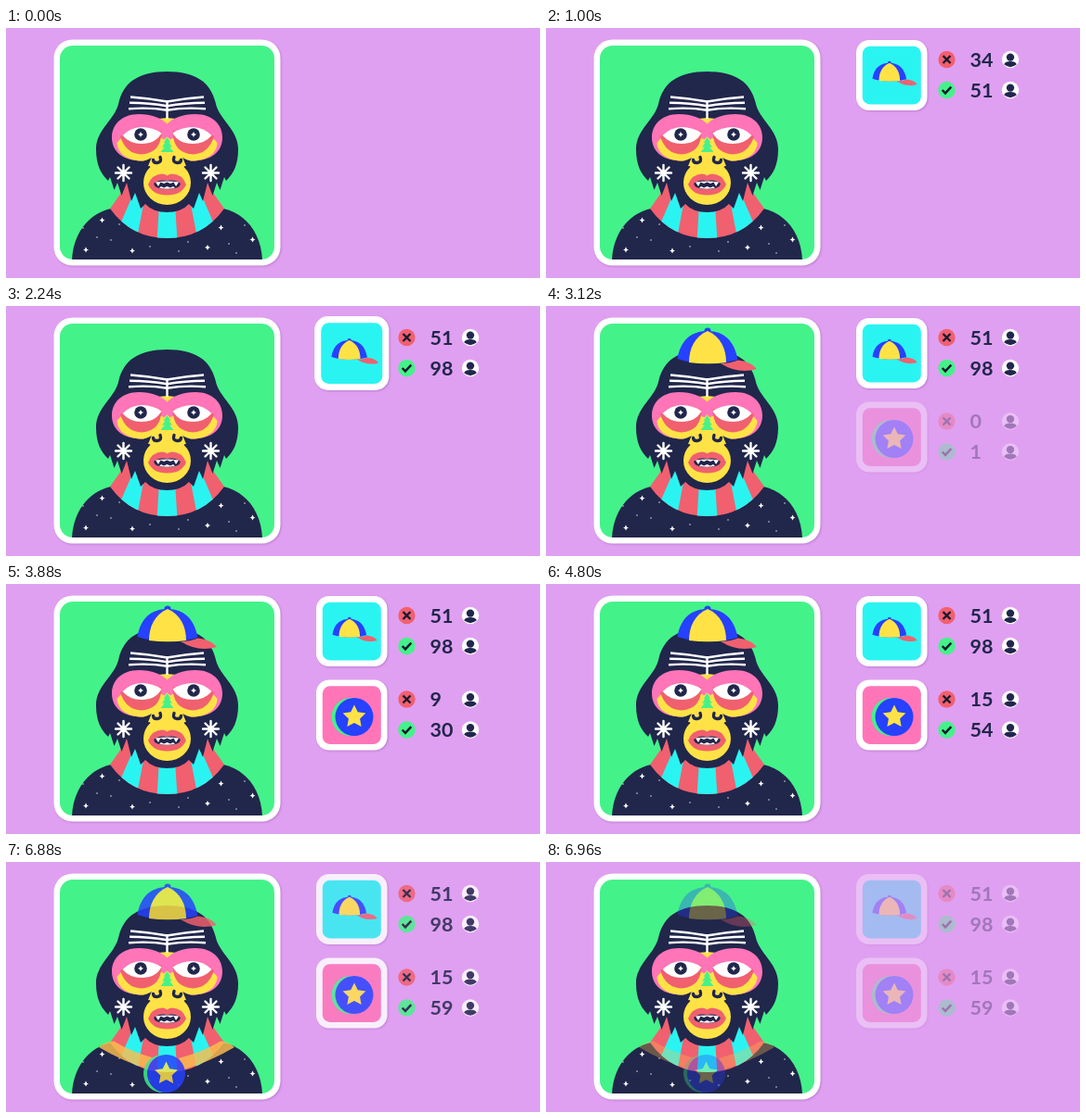
These frames come from a looping animation (575 px wide and 270 px high, 7 s). An HTML page:

```html
<!DOCTYPE html>
<html lang="en">
<head>
<meta charset="utf-8">
<title>Voting for accessories</title>
<style>
  html, body { margin: 0; width: 100%; height: 100%; overflow: hidden; background: #e0a0f1; }
  svg { display: block; width: 575px; height: 270px; }
  text { font: 700 21.5px Lato, sans-serif; fill: #21264b; }
  .card { filter: drop-shadow(1px 1.5px 1px #7a3d9455); }
  .navy { fill: #21264b; } .white { fill: #fff; } .green { fill: #44f28a; }
  .pink { fill: #ff75b8; } .coral { fill: #f1606f; } .yellow { fill: #ffe346; }
  .cyan { fill: #2af4f1; } .blue { fill: #2641ff; } .orange { fill: #fbbe4f; }
  .line { fill: none; stroke: #fff; stroke-width: 2.4; }
  .mark { fill: none; stroke: #15182f; stroke-width: 2.4; }
</style>
</head>
<body>
<svg viewBox="0 0 575 270">
  <defs>
    <clipPath id="inside"><rect x="58" y="19" width="231" height="231" rx="14"/></clipPath>
    <clipPath id="scarfShape">
      <path d="M112 195 L124 178 L129 165 L218 165 L223 178 L235 195 Q212 227 173.5 227 Q135 227 112 195Z"/>
    </clipPath>
    <path id="spark" d="M0-3 Q.5-.5 3 0 Q.5 .5 0 3 Q-.5 .5-3 0 Q-.5-.5 0-3Z"/>

    <g id="cap">
      <circle class="blue" cx="174" cy="27" r="3.6"/>
      <path class="blue" d="M141.5 57 C145 37 156 27 174 27 C192 27 203 38 206.5 58 Q190 63 174 62 Q156 62 141.5 57Z"/>
      <path class="yellow" d="M174 27 C160 33 154 46 154 61 Q174 63.5 194 61 C194 46 188 33 174 27Z"/>
      <path class="coral" d="M188 62 Q198 62 207 58.5 Q221 60 227 68 Q207 74 188 62Z"/>
    </g>

    <g id="badge">
      <circle class="green" cx="-4" r="20.5"/>
      <circle class="blue" r="20.5"/>
      <path id="star" class="yellow"/>
    </g>

    <g id="user">
      <circle class="white" r="9.2"/>
      <circle class="navy" cy="-2.4" r="4.2"/>
      <path class="navy" d="M-6.8 5.3 Q-5.5 2 0 2 Q5.500 2 6.800 5.300 Q0 11-6.800 5.300Z"/>
    </g>

    <g id="halfFace">
      <path class="navy" d="M174 47 C142 47 127 59 121.5 80 C118 99 97 109 97 131 C97 148 102 157 110 165
        L112 161 L116.5 175 L120 167 L124.5 181 L130 167 L135 187 L139 178 L145 195
        L150 190 Q158 199 174 199Z"/>
      <path class="line" d="M134 74.5 Q155 76 173.5 79.5 M133 80.8 Q155 81 173.5 84.2 M132 87.3 Q155 85.5 173.5 88.8"/>
      <path class="yellow" d="M174 97 L164 98 L150 120 L158 137 L153 149 L174 152Z"/>
      <path class="pink" d="M174 117 V104 C167 97 157 93 143 93 C125 93 114 104 114 118 C114 134 126 143.500 147 143.500 Q158 142 165 125Z"/>
      <path class="yellow" d="M119.5 124 C120 136 131 143.5 148 143.5 Q163 141 170 120 L150 112 Q128 112 119.500 124Z"/>
      <path class="coral" d="M123 117 Q145 104 167.5 112 Q167 135 146 136.5 Q129 136 123 117Z"/>
      <path class="white" d="M125.5 116 Q134 107.5 146 107 Q158 107 167.5 113.5 Q161 125 146 125 Q133 125 125.500 116Z"/>
      <circle class="navy" cx="145" cy="115" r="6.8"/>
      <use href="#spark" class="white" x="145" y="115"/>
      <path class="line" stroke-linecap="round" transform="translate(126.5 156.5)"
        d="M0-8.5V8.500M-8.500 0H8.500M-6-6L6 6M6-6L-6 6"/>
    </g>
  </defs>

  <rect class="card white" x="51.5" y="12.5" width="244" height="244" rx="20"/>
  <rect class="green" x="58" y="19" width="231" height="231" rx="14"/>

  <g clip-path="url(#inside)">
    <path class="navy" d="M71 251 C72 224 87 201 113 195 H234 C260 201 275 224 276 251Z"/>
    <g id="sky" class="white"></g>
    <g clip-path="url(#scarfShape)">
      <path class="coral" d="M100 160H247V230H100Z"/>
      <path class="cyan" d="M122 214 L138 177 L150 180 L141 227Z M162.5 230 L165 190 H182 L184.5 230Z M225 214 L209 177 L197 180 L206 227Z"/>
    </g>
    <use href="#halfFace"/>
    <use href="#halfFace" transform="translate(347) scale(-1 1)"/>
    <path class="line" d="M173.5 78V98"/>
    <ellipse class="yellow" cx="173.5" cy="167" rx="25.500" ry="24"/>
    <path class="yellow" d="M160 135H187L192 150H155Z"/>
    <path class="green" d="M173.5 118 L177.5 124 L175.5 123.5 L179 129 L176 128.5 L180.500 134 H166.500 L171 128.500 L168 129 L171.500 123.500 L169.500 124Z"/>
    <path fill="none" stroke="#21264b" stroke-width="3.4" stroke-linecap="round"
      d="M158.5 142.5 Q159 146 163 145.5 Q168 145 166 139.5 M188.5 142.5 Q188 146 184 145.5 Q179 145 181 139.5"/>
    <path class="coral" d="M153 169 Q157 158 168 157.5 Q171 157.5 173.500 159.500 Q176 157.500 179 157.500 Q190 158 194 169 Q189 180.500 173.500 180.500 Q158 180.500 153 169Z"/>
    <path class="navy" d="M159 168 Q165 163 173.5 165 Q182 163 188 168 Q187 174 173.5 174 Q160 174 159 168Z"/>
    <path class="white" d="M161 166.5 L164 171 L166.5 166.5 L170 168 L173.5 166.5 L177 168 L180.5 166.5 L183 171 L186 166.500 Q174 164.500 161 166.500Z
      M165 173 L167 171 L170 172.500 L173.500 171 L177 172.500 L180 171 L182 173 Q173 174.500 165 173Z"/>
    <use id="wornCap" href="#cap"/>
    <g id="wornBadge">
      <path class="orange" d="M100 200 Q107 194 116 193.5 Q135 205 160 212 L154 224 Q125 215 100 200Z M246 200 Q239 194 231 193.5 Q212 205 186 212 L192 224 Q221 215 246 200Z"/>
      <use href="#badge" transform="translate(172.5 228.5)"/>
    </g>
  </g>
  <g id="panels"></g>
</svg>

<script>
const LOOP = 7000, STEP = 40;
const $ = id => document.getElementById(id);
const clamp = x => Math.min(1, Math.max(0, x));

$('star').setAttribute('d', 'M' + Array.from({ length: 10 }, (_, i) => {
  const r = i % 2 ? 6.4 : 13, a = i * Math.PI / 5;
  return `${r * Math.sin(a)} ${-r * Math.cos(a)}`;
}).join('L') + 'Z');

const sparks = [[103.5, 207.5], [86, 239.5], [136, 240.5], [231.5, 215.5], [217, 237], [265.5, 228.5]];
const dots = [[83, 216], [113, 229], [122, 212], [155, 236], [186, 241], [196, 231], [240, 233], [257, 213], [248, 243], [98, 226]];
$('sky').innerHTML =
  sparks.map(([x, y]) => `<use href="#spark" x="${x}" y="${y}"/>`).join('') +
  dots.map(([x, y]) => `<circle cx="${x}" cy="${y}" r=".7"/>`).join('');

// Each count has a final value and an easing duration.
const panels = [
  { y: 0, start: 400, pulse: 1880, color: 'cyan', no: [51, 1290], yes: [98, 1740],
    art: '<use href="#cap" transform="translate(271.5 22.5) scale(.565)"/>' },
  { y: 90.5, start: 3120, pulse: 4960, color: 'pink', no: [15, 1800], yes: [59, 2280],
    art: '<use href="#badge" transform="translate(375 53)"/>' }
];

const row = (y, color, mark) => `
  <circle class="${color}" cx="431.5" cy="${y}" r="9.2"/>
  <path class="mark" transform="translate(431.5 ${y})" d="${mark}"/>
  <text x="456.5" y="${y + 7.7}"></text>
  <use href="#user" x="500" y="${y}"/>`;

for (const p of panels) {
  p.el = document.createElementNS('http://www.w3.org/2000/svg', 'g');
  p.el.setAttribute('transform', `translate(0 ${p.y})`);
  p.el.innerHTML = `<g>
      <rect class="card white" x="334" y="13" width="76.5" height="76" rx="14"/>
      <rect class="${p.color}" x="340.8" y="19.8" width="63" height="62.6" rx="8"/>
      ${p.art}</g>` +
    row(34, 'coral', 'M-4-4L4 4M4-4L-4 4') +
    row(67, 'green', 'M-4.8 0L-1.5 3.4L4.800-3.400');
  $('panels').append(p.el);
  p.thumb = p.el.firstElementChild;
  p.labels = p.el.querySelectorAll('text');
}

const count = (from, [to, duration], t) =>
  Math.round(from + (to - from) * Math.sin(clamp(t / duration) * Math.PI / 2));

function draw(now) {
  const t = Math.floor(now % LOOP / STEP) * STEP;
  const fadeOut = 1 - clamp((t - 6853) / 160);
  for (const p of panels) {
    const age = t - p.start;
    p.el.setAttribute('opacity', age < 0 ? 0 : clamp(.33 + age / 120) * fadeOut);
    p.labels[0].textContent = count(0, p.no, age);
    p.labels[1].textContent = count(1, p.yes, age);
    const scale = 1 + .16 * Math.sin(Math.PI * clamp((t - p.pulse) / 400));
    p.thumb.setAttribute('transform', `translate(372.3 51) scale(${scale}) translate(-372.3 -51)`);
  }
  $('wornCap').setAttribute('opacity', t < 2520 ? 0 : fadeOut);
  $('wornBadge').setAttribute('opacity', t < 5440 ? 0 : fadeOut);
}

const origin = performance.now();
function tick() {
  draw(performance.now() - origin);
  requestAnimationFrame(tick);
}
tick();
</script>
</body>
</html>
```
